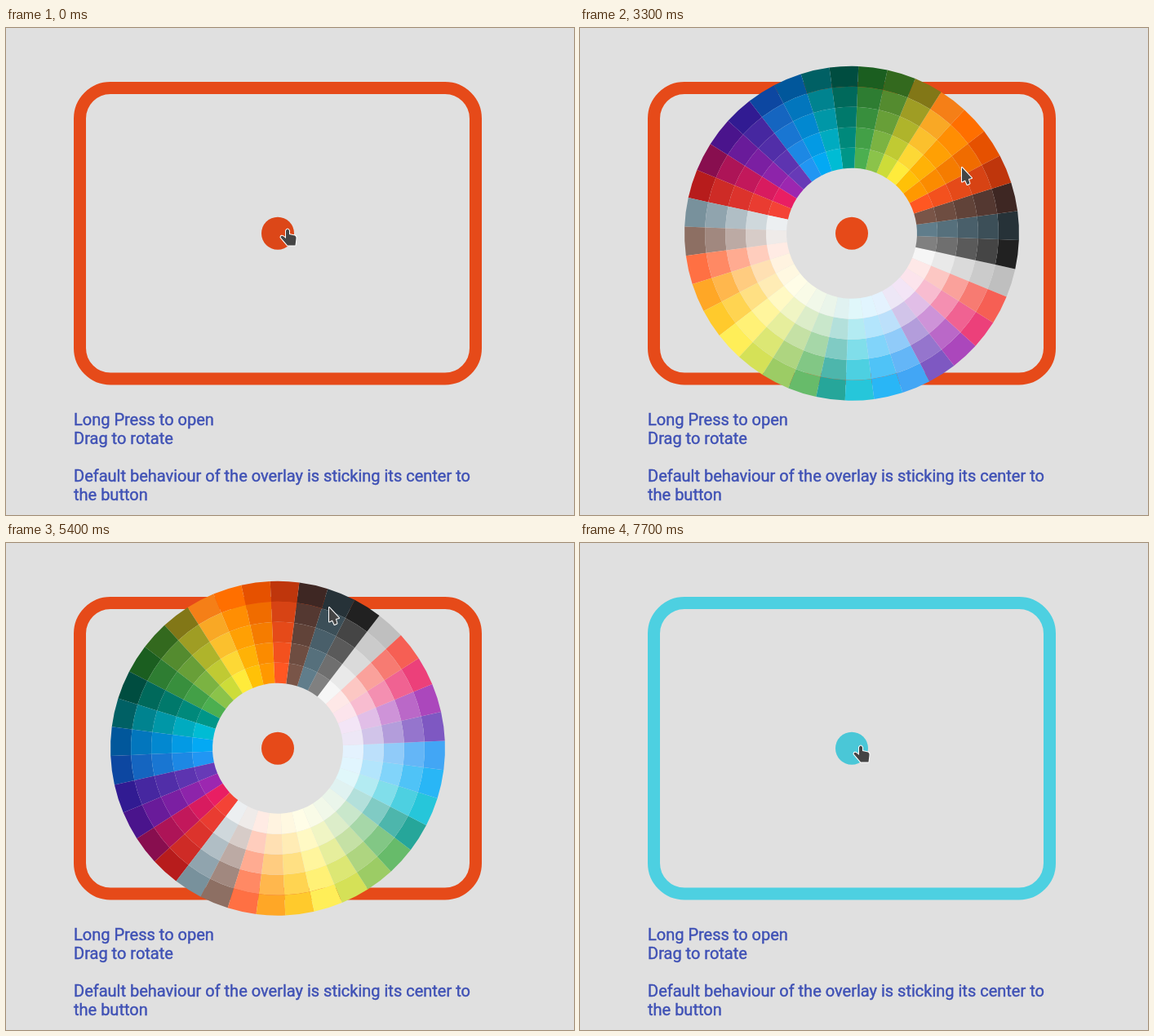
Recreate the animation shown at these times as an HTML page with a canvas. Size 696x597 px, loop 8 s.

```html
<!DOCTYPE html>
<html>
<head>
<meta charset="utf-8">
<style>
html, body { margin: 0; width: 100%; height: 100%; overflow: hidden; background: #e0e0e0; }
canvas { position: absolute; left: 0; top: 0; }
p {
  position: absolute; left: 83px; top: 469px; margin: 0; white-space: pre;
  font: 20px/23px Roboto, sans-serif; color: #3f51b5; -webkit-text-stroke: .45px #3f51b5;
}
</style>
</head>
<body>
<canvas id="stage" width="696" height="597"></canvas>
<p>Long Press to open
Drag to rotate

Default behaviour of the overlay is sticking its center to
the button</p>
<script>
const ctx = document.getElementById('stage').getContext('2d');
const CX = 333, CY = 251.75, INNER = 80, RING = 25, TRAVEL = 125;
const COUNT = 36, STEP = 2 * Math.PI / COUNT;
const ORANGE = '#e64a19', CYAN = '#4dd0e1';

const clamp = x => Math.min(1, Math.max(0, x));
const ramp = (t, a, b) => clamp((t - a) / (b - a));
const mix = (a, b, f) => a.map((v, i) => v + (b[i] - v) * f);
const rgb = hex => [0, 2, 4].map(i => parseInt(hex.substr(i, 2), 16));
const css = c => `rgb(${c.map(Math.round)})`;

// Rim and hub colour of each dark slice; light slices thin the hub colour with white.
const rims = 'b71c1c 880e4f 4a148c 311b92 0d47a1 01579b 006064 004d40 1b5e20 33691e 827717 f57f17 ff6f00 e65100 bf360c 3e2723 263238 212121'.split(' ').map(rgb);
const hubs = 'f44336 e91e63 9c27b0 673ab7 2196f3 03a9f4 00bcd4 009688 4caf50 8bc34a cddc39 ffeb3b ffc107 ff9800 ff5722 795548 607d8b 808080'.split(' ').map(rgb);
const white = [255, 255, 255];
const slices = [
  ...rims.map((rim, i) => [0, .38, .6, .82, 1].map(f => css(mix(rim, hubs[i], f)))),
  ...[rgb('b4b4b4'), ...hubs.slice(0, 17)].map(hub => [.85, .7, .5, .3, .12].map(k => css(mix(white, hub, k)))),
];

const SLIDE = 350, MID = 6900, OPEN = 1850, CLOSED = 7400;

// Neighbours alternate between early and late, most strongly around slice 6.
function stagger(i) {
  const c = Math.cos((i - 6) * STEP), sign = i % 2 ? 1 : -1;
  return .66 + .15 * c + sign * (.25 + .45 * c) + .3 * Math.cos(i * Math.PI / 4);
}

// Key points: time, then values.
const spin = [[2900, 180], [3300, 192.3], [4400, 183.7], [5400, 127.4], [5600, 126.4]];
const path = [[400, 345, 247], [600, 339, 249], [1900, 339, 249], [3300, 468, 171], [4400, 402, 122],
  [5400, 396, 79], [5600, 409, 114], [5900, 485, 300], [6300, 485, 300], [6500, 530, 300],
  [6900, 351, 255], [7400, 344, 249]];

function along(keys, t) {
  const n = keys.findIndex(k => k[0] > t);
  if (n <= 0) return keys.at(n).slice(1);
  const a = keys[n - 1], b = keys[n];
  return mix(a, b, ramp(t, a[0], b[0])).slice(1);
}

function disc(x, y, r, fill) {
  ctx.beginPath();
  ctx.arc(x, y, r, 0, 7);
  ctx.fillStyle = fill;
  ctx.fill();
}

function drawSlice(i, x, y, a) {
  slices[i].forEach((fill, ring) => {
    const r = INNER + RING * (4 - ring);
    ctx.beginPath();
    ctx.arc(x, y, r + RING, a, a + STEP);
    ctx.arc(x, y, r, a + STEP, a, true);
    ctx.fillStyle = fill;
    ctx.fill();
  });
}

function drawWheel(t) {
  const turn = along(spin, t)[0] * Math.PI / 180;
  const clock = t < 4500 ? CLOSED - (t - OPEN) : t;   // opening runs the closing backwards
  for (let n = 0; n < COUNT; n++) {
    const i = (COUNT * 1.5 - n) % COUNT, a = turn + i * STEP;
    const f = clamp((clock - MID) / SLIDE + stagger(i));
    const d = TRAVEL * (1 - Math.cos(Math.PI * f)) / 2;
    drawSlice(i, CX - d * Math.cos(a), CY - d * Math.sin(a), a);
  }
}

function drawButton(t, color) {
  disc(CX, CY, 20, color);
  const hover = t < 2000 ? 1 : ramp(t, CLOSED, 7700);
  disc(CX, CY, 20, `rgba(0,0,0,${.045 * hover})`);
  if (t < 1200 || t > 2200) return;
  const fade = 1 - ramp(t, 1900, 2200);
  ctx.save();
  ctx.beginPath();
  ctx.arc(CX, CY, 20, 0, 7);
  ctx.clip();
  disc(CX, CY, 20, `rgba(205,200,195,${.4 * ramp(t, 1100, 1600) * fade})`);
  disc(339, 250, 14 * (t - 1100) / 500, `rgba(205,200,195,${.35 * fade})`);
  ctx.restore();
}

const arrow = new Path2D('M0 0V17.5L4 15.5 6.5 21 9.5 19.5 7.8 14 12 13Z');
const hand = new Path2D('M-2 1.5Q0-2.5 2 1.5V6L9 7.5Q11 8.5 10.5 11L9.5 19.5H0L-8.5 9.5Q-8 6.5-5 8.5L-2 11Z');

function drawCursor(t) {
  const shape = t < 1900 || t >= CLOSED ? hand : arrow;
  ctx.save();
  ctx.translate(...along(path, t));
  ctx.lineJoin = 'round';
  ctx.lineWidth = 2;
  ctx.strokeStyle = '#fff';
  ctx.stroke(shape);
  ctx.fillStyle = '#454545';
  ctx.fill(shape);
  ctx.restore();
}

function draw(now) {
  const t = Math.floor(now % 8000 / 100) * 100;
  const color = t < 6200 ? ORANGE : CYAN;
  ctx.clearRect(0, 0, 696, 597);
  ctx.beginPath();
  ctx.roundRect(90.5, 73.5, 485, 356.5, 37.5);
  ctx.lineWidth = 15;
  ctx.strokeStyle = color;
  ctx.stroke();
  drawButton(t, color);
  if (t > OPEN && t < CLOSED) drawWheel(t);
  drawCursor(t);
}

let start;
function tick(now) {
  start ??= now;
  draw(now - start);
  requestAnimationFrame(tick);
}
draw(0);
requestAnimationFrame(tick);
</script>
</body>
</html>
```
